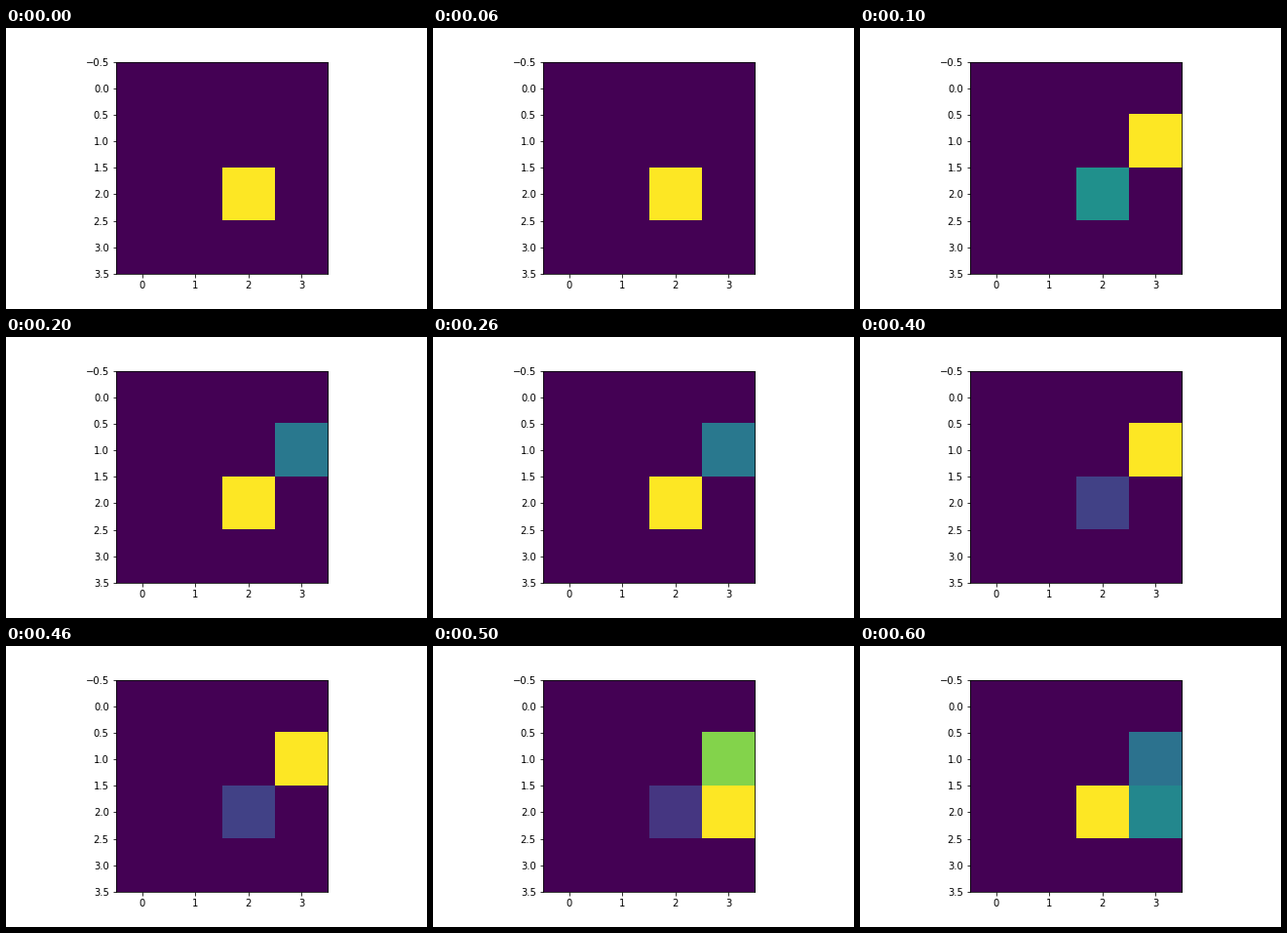
Write a matplotlib script that moves like this. It is 432 px wide and 288 px high and loops after 700 ms.

```python
import numpy as np
import matplotlib.pyplot as plt
from matplotlib.animation import FuncAnimation

DECAY = 0.5
A, B, C = (2, 2), (1, 3), (2, 3)  # (row, column)
VISITS = [A, B, A, B, B, C, A]

plt.rcParams.update({"font.family": "DejaVu Sans", "font.size": 10})


def trace(step):
    """Decaying visit trace after the given step, scaled to a peak of 1."""
    grid = np.zeros((4, 4))
    for cell in VISITS[:step + 1]:
        grid *= DECAY
        grid[cell] += 1
    return grid / grid.max()


fig, ax = plt.subplots(figsize=(6, 4), dpi=72, facecolor="white")
fig.subplots_adjust(left=0.125, right=0.9, bottom=0.125, top=0.88)
image = ax.imshow(trace(0), cmap="viridis", vmin=0, vmax=1,
                  interpolation="nearest")
ax.set_xticks(range(4))
ax.set_yticks(np.arange(-0.5, 4, 0.5))


def update(step):
    image.set_data(trace(step))
    return [image]


anim = FuncAnimation(fig, update, frames=len(VISITS), interval=100,
                     repeat=True, repeat_delay=0, blit=False)
plt.show()
```
